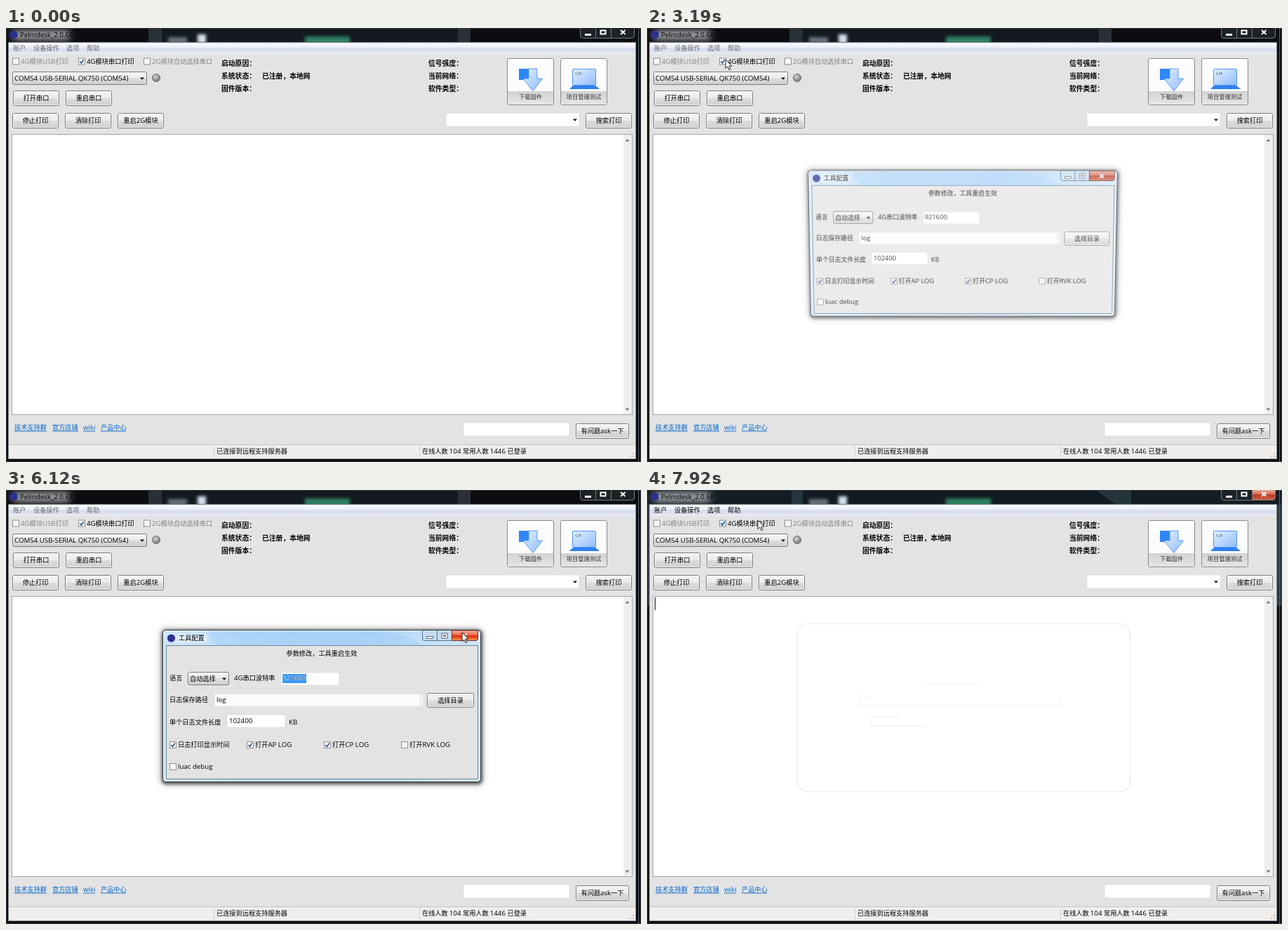
An HTML page for the animation above (8000 ms loop, 905 by 618 pixels).

```html
<!DOCTYPE html>
<html lang="zh-CN">
<head>
<meta charset="utf-8">
<title>Pelmdesk</title>
<style>
html, body { margin: 0; width: 100%; height: 100%; overflow: hidden; background: #08090b; }
svg { position: absolute; left: 0; top: 0; width: 905px; height: 618px; }
text { font: 9.2px "Noto Sans CJK SC", "Noto Sans CJK", "Noto Sans", sans-serif; white-space: pre; }
text.b { font-size: 9.8px; font-weight: 700; }
text.s { font-size: 8.3px; }
tspan { font-family: "Open Sans", "Noto Sans", sans-serif; font-size: 9.7px; }
#dlg { transform-origin: 450px 307.5px; }
.menu text { fill: #6b6b6b; }
.on .menu text { fill: #000; }
.live, .on .idle { display: none; }
.on .live { display: inline; }
</style>
</head>
<body>
<svg id="main" viewBox="0 0 905 618">
  <defs>
    <linearGradient id="btn" x2="0" y2="1"><stop stop-color="#f5f5f5"/><stop offset=".48" stop-color="#ebebeb"/><stop offset=".52" stop-color="#dcdcdc"/><stop offset="1" stop-color="#cfcfcf"/></linearGradient>
    <linearGradient id="hot" x2="0" y2="1"><stop stop-color="#eaf5fc"/><stop offset=".48" stop-color="#d8edf9"/><stop offset=".52" stop-color="#c2e2f5"/><stop offset="1" stop-color="#aed6ee"/></linearGradient>
    <linearGradient id="bar" x2="0" y2="1"><stop stop-color="#fbfcfe"/><stop offset=".45" stop-color="#e6eaf5"/><stop offset=".5" stop-color="#d5dcee"/><stop offset="1" stop-color="#dfe4f2"/></linearGradient>
    <linearGradient id="red" x2="0" y2="1"><stop stop-color="#e8a897"/><stop offset=".45" stop-color="#cf6a55"/><stop offset=".5" stop-color="#b8321c"/><stop offset="1" stop-color="#d0694c"/></linearGradient>
    <linearGradient id="glow" x2="0" y2="1"><stop stop-color="#ffb19c"/><stop offset=".45" stop-color="#f0694c"/><stop offset=".5" stop-color="#d8240c"/><stop offset="1" stop-color="#ff9a4c"/></linearGradient>
    <linearGradient id="sky" x2="1"><stop stop-color="#cfe6fa"/><stop offset=".3" stop-color="#b4d9f8"/><stop offset=".62" stop-color="#acd4f7"/><stop offset="1" stop-color="#d3e9fb"/></linearGradient>
    <linearGradient id="ice" x2="1" y2="1"><stop stop-color="#e4f0ff"/><stop offset="1" stop-color="#8fbcfb"/></linearGradient>
    <linearGradient id="band" x2="0" y2="1"><stop stop-color="#d2d2d2"/><stop offset="1" stop-color="#e6e6e6"/></linearGradient>
    <radialGradient id="ball" cx=".4" cy=".35"><stop stop-color="#d8d8d8"/><stop offset="1" stop-color="#858585"/></radialGradient>
    <filter id="soft" x="-50%" y="-100%" width="200%" height="300%"><feGaussianBlur stdDeviation="2"/></filter>
    <filter id="wide" x="-50%" y="-100%" width="200%" height="300%"><feGaussianBlur stdDeviation="5"/></filter>
  </defs>
</svg>
<svg id="dlg" viewBox="0 0 905 618"></svg>
<svg id="top" viewBox="0 0 905 618">
  <path id="arrow" d="M0 0V12.6L2.9 9.9L5 14.6L7 13.7L5 9.1H9Z" fill="#fff" stroke="#111" stroke-width=".9"/>
  <path id="beam" d="M-3 -6H-1L0 -5.2L1 -6H3M0 -5V5M-3 6H-1L0 5.2L1 6H3" fill="none" stroke="#111"/>
</svg>
<script>
const $ = id => document.getElementById(id);
const rect = (x, y, x2, y2, fill, more = '') =>
  `<rect x="${x}" y="${y}" width="${x2 - x}" height="${y2 - y}" fill="${fill}" ${more}/>`;
const path = (d, fill, more = '') => `<path d="${d}" fill="${fill}" ${more}/>`;
const line = (d, color, w = 1) => path(d, 'none', `stroke="${color}" stroke-width="${w}"`);
const latin = s => s.replace(/[\x21-\x7e][\x20-\x7e]*/g,
  m => `<tspan>${m.replace(/</g, '&lt;')}</tspan>`);
// y is the middle of the line
const text = (x, y, s, more = '') => `<text x="${x}" y="${y + 3.4}" ${more}>${latin(s)}</text>`;
const mid = (x, y, s, more = '') => text(x, y, s, 'text-anchor="middle" ' + more);
const box = (x, y, x2, y2, fill, more = '') =>
  rect(x + .5, y + .5, x2 - .5, y2 - .5, fill, 'rx="2" stroke="#7c7c7c" ' + more);
const button = (x, y, x2, y2, s, id = '') =>
  box(x, y, x2, y2, 'url(#btn)', id && `id="${id}"`) +
  rect(x + 1.5, y + 1.5, x2 - 1.5, y2 - 1.5, 'none', 'rx="1" stroke="#fff" stroke-opacity=".7"') +
  mid((x + x2) / 2, (y + y2) / 2, s);
const field = (x, y, x2, y2, more = '') => rect(x, y, x2, y2, '#fff', 'stroke="#d2d4d8" stroke-width=".6" ' + more);
const drop = (x, y) => path(`M${x - 3} ${y - 1.5}h6l-3 3.2z`, '#111');
const check = (x, y, s, ticked, color = '#000', id = '') =>
  rect(x + .5, y - 4.5, x + 9.5, y + 4.5, '#f6f6f6', `stroke="#8e8f8f" ${id && `id="${id}"`}`) +
  (ticked ? line(`M${x + 2.4} ${y}l2 2.4l3.4 -5`, '#2c4a8c', 1.5) : '') +
  text(x + 12, y, s, `fill="${color}"`);

const glass =
  rect(0, 0, 905, 618, '#0b0d10') +
  `<g class="idle">${rect(203, 0, 662, 21, '#2b2f37')}${rect(222, 0, 644, 21, '#14191f')}</g>` +
  `<g class="live">${rect(0, 0, 905, 21, '#141d23')}${rect(206, 0, 690, 21, '#26343d')}` +
  path('M222 0H640L668 21H222Z', '#131b22') + rect(0, 21, 4, 165, '#2d3840') + rect(898, 21, 905, 165, '#2d3840') + '</g>' +
  `<g filter="url(#soft)">${rect(231, 13, 258, 22, '#8a97a3', 'opacity=".7"')}${rect(273, 9, 285, 22, '#d5e2ee')}` +
  rect(426, 12, 490, 23, '#2f8064') + '</g>' +
  rect(8, 3, 92, 17, '#b5b8bb', 'rx="7" filter="url(#wide)" opacity=".85"') +
  rect(.5, .5, 904.5, 617.5, 'none', 'stroke="#33383d"') + line('M901.5 0V618', '#5c646a') +
  rect(3.5, 20.5, 897.5, 613.5, 'none', 'stroke="#858b90"') +
  '<circle cx="11" cy="9.5" r="5.7" fill="#2b3090"/>' + text(20, 9.5, 'Pelmdesk_2.0.68') +
  path('M818.5 0V11Q818.5 14.5 822 14.5H892Q895.5 14.5 895.5 11V0', '#1d2227', 'stroke="#737a80"') +
  `<g class="live">${path('M862.5 0V14H892Q895 14 895 11V0Z', 'url(#red)')}</g>` +
  line('M840.5 0V14M862.5 0V14', '#737a80') +
  rect(825, 8, 834, 11, '#fff') + rect(847.5, 3.5, 854.5, 8.5, 'none', 'stroke="#fff" stroke-width="2"') +
  line('M876 3L882.5 9M882.5 3L876 9', '#fff', 2);

const bold = [[307, 51, '启动原因：'], [307, 69, '系统状态：'], [365, 69, '已注册，本地网'], [307, 87, '固件版本：'],
  [602, 51, '信号强度：'], [602, 69, '当前网络：'], [602, 87, '软件类型：']];
const links = [[12, 58, '技术支持群'], [66, 103, '官方店铺'], [110, 127, 'wiki'], [135, 171, '产品中心']];
const tile = (x, s) => rect(x + .5, 43.5, x + 66.5, 109.5, '#fcfcfc', 'rx="2" stroke="#8b8b8b"') +
  rect(x + 1, 90, x + 66, 109, 'url(#band)') + mid(x + 33.5, 98, s, 'class="s" fill="#333"');

$('main').innerHTML += glass +
  rect(4, 21, 897, 613, '#e3e3e3') + rect(4, 22, 897, 36, 'url(#bar)') + line('M4 36H897', '#f3f4f7') +
  '<g class="menu">' + text(10, 29, '账户') + text(39, 29, '设备操作') + text(86, 29, '选项') + text(115, 29, '帮助') + '</g>' +
  check(9, 47.5, '4G模块USB打印', false, '#858585') + check(103, 47.5, '4G模块串口打印', true, '#000', 'tick') +
  check(196, 47.5, '2G模块自动选择串口', false, '#858585') +
  box(9, 62, 201, 81, 'url(#btn)', 'id="port"') + text(12, 72, 'COM54 USB-SERIAL QK750 (COM54)') + drop(194, 72) +
  '<circle cx="214" cy="71" r="5.6" fill="url(#ball)" stroke="#777"/>' +
  button(10, 89, 76, 111, '打开串口') + button(85, 89, 151, 111, '重启串口') +
  button(9, 121, 75, 143, '停止打印') + button(84, 121, 150, 143, '清除打印') + button(159, 121, 225, 143, '重启2G模块') +
  bold.map(([x, y, s]) => text(x, y, s, 'class="b"')).join('') +
  tile(714, '下载固件') + rect(731, 58, 746, 74, '#2f86f6') +
  path('M745 58H757V72H764.5L751 89.5L737 72H745Z', 'url(#ice)', 'stroke="#4d93f3" stroke-width=".9"') +
  tile(790, '项目管理测试') + rect(807.5, 58.5, 840.5, 81.5, 'url(#ice)', 'rx="1" stroke="#4d93f3"') +
  line('M813.5 63l-2 1.8l2 1.8M817 62.5l-1.6 4.6M818 63l2 1.8l-2 1.8', '#345', .8) +
  path('M808 82H840L846 87H803Z', '#2f80ee') +
  field(627, 121, 817, 140) + drop(811, 131) + button(826, 121, 892, 143, '搜索打印') +
  rect(8.5, 151.5, 892.5, 550.5, '#fff', 'stroke="#a3a6aa"') + rect(880, 152, 892, 550, '#eeeeee') +
  path('M882.5 161.5h6l-3 -3.4z', '#777') + path('M882.5 541.5h6l-3 3.4z', '#777') +
  links.map(([x, x2, s]) => text(x, 569, s, 'fill="#0066cc"') + line(`M${x} 574H${x2}`, '#0066cc', .9)).join('') +
  field(652, 562, 803, 581) + button(812, 563, 888, 585, '有问题ask一下') +
  rect(4, 593, 897, 613, '#f0eeec') + line('M4 593.5H897', '#c4c4c4') + line('M296.5 595V612M589.5 595V612', '#cfcfcf') +
  text(300, 603, '已连接到远程支持服务器') + text(593, 603, '在线人数 104 常用人数 1446 已登录') +
  path('M893 611h2v-2h-2zM889 611h2v-2h-2zM893 607h2v-2h-2z', '#c3c3c3') +
  `<g id="ghost" fill="none" stroke="#eeeeee" stroke-width="1.4">` +
  '<rect x="214.5" y="190.5" width="474" height="239" rx="14"/>' +
  '<path d="M394 277H473M303 293V307H588V294M303 293h6v3h12M320 336H398M320 336V323H356V327" stroke-width="1"/></g>' +
  line('M11.5 153V171', '#000', 1).replace('<path', '<path id="caret"') +
  '<g id="list">' + rect(82.5, 36.5, 186.5, 57.5, '#f1f1f1', 'stroke="#979797"') +
  rect(84.5, 38.5, 184.5, 55.5, '#dcebfa', 'id="pick" rx="2" stroke="#aecff7"') + text(108, 47, '工具配置') + '</g>';

$('dlg').innerHTML =
  rect(219, 196, 681, 421, '#000', 'rx="10" opacity=".2" filter="url(#wide)"') +
  rect(222, 199, 679, 419, '#000', 'rx="6" opacity=".6" filter="url(#soft)"') +
  rect(223.5, 199.5, 676.5, 415.5, 'url(#sky)', 'rx="5" stroke="#2c3640"') +
  path('M290 201H540Q575 208 592 221H300Q292 212 290 201Z', '#9fcdf6', 'opacity=".45"') +
  rect(224.5, 200.5, 675.5, 414.5, 'none', 'rx="4" stroke="#fff" stroke-opacity=".75"') +
  rect(228.5, 221.5, 672.5, 411.5, '#e3e3e3', 'stroke="#6f8798"') +
  '<circle cx="235.5" cy="211" r="5.6" fill="#2b3090"/>' +
  rect(243, 205, 286, 217, '#fff', 'opacity=".5" filter="url(#soft)"') + text(246, 211, '工具配置') +
  path('M593.5 200V211Q593.5 214.5 597 214.5H669Q672.5 214.5 672.5 211V200', '#c5dcf0', 'stroke="#5d7285"') +
  path('M635.5 200V214.5H669Q672.5 214.5 672.5 211V200Z', 'url(#red)', 'id="quit" stroke="#6b3a35"') +
  line('M614.5 200V214', '#5d7285') +
  rect(599.5, 208.5, 608.5, 211.5, '#fff', 'stroke="#4a5866" stroke-width=".8"') +
  rect(621, 204, 629, 211, '#fff', 'stroke="#4a5866" stroke-width=".9"') + rect(623.5, 206.5, 626.5, 208.5, '#9ab', 'stroke="#4a5866" stroke-width=".7"') +
  line('M650.5 204.5L657 210.5M657 204.5L650.5 210.5', '#5a2a25', 3) + line('M650.5 204.5L657 210.5M657 204.5L650.5 210.5', '#fff', 1.8) +
  mid(450, 233, '参数修改，工具重启生效') +
  text(233, 268, '语言') + box(259, 259, 318, 278, 'url(#btn)') + text(262, 269, '自动选择') + drop(311, 269) +
  text(325, 268, '4G串口波特率') + field(392, 260, 475, 278, 'id="rate"') +
  rect(394, 262, 428, 275, '#3399ff', 'id="sel"') + text(394, 268, '921600') +
  `<clipPath id="cut">${rect(394, 262, 428, 275, '#000', 'id="cutbox"')}</clipPath>` +
  `<g clip-path="url(#cut)">${text(394, 268, '921600', 'fill="#fff"')}</g>` +
  text(233, 299, '日志保存路径') + rect(296.5, 290, 595.5, 309, '#f0f0f0', 'stroke="#d6d6d6" stroke-width=".6"') + rect(298, 291, 589, 307, '#fcfcfc') +
  text(300, 299, 'log') + button(600, 289, 667, 310, '选择目录', 'pickdir') +
  text(233, 331, '单个日志文件长度') + field(315, 320, 398, 338) + text(318, 329, '102400') + text(403, 331, 'KB') +
  check(233, 363, '日志打印显示时间', true) + check(343, 363, '打开AP LOG', true) + check(453, 363, '打开CP LOG', true) +
  check(563, 363, '打开RVK LOG', false) + check(233, 394, 'luac debug', false);

// Runs of picture changes: start, end, count
const runs = [[0, 0, 1], [360, 1140, 11], [1220, 1620, 6], [1696, 2000, 5], [2090, 2090, 1], [2310, 2500, 3],
  [2640, 2690, 2], [2860, 3190, 5], [3265, 3640, 6], [3710, 3950, 4], [4042, 4500, 6], [4580, 4730, 3],
  [4880, 5650, 11], [5740, 6120, 6], [6600, 6820, 4], [6897, 7360, 7], [7460, 7770, 5], [7920, 7920, 1]];
const ticks = runs.flatMap(([a, b, n]) => Array.from({ length: n }, (_, i) => n > 1 ? a + (b - a) * i / (n - 1) : a));

// Keys: time, x, y
const mouse = [[360, 809, 582], [820, 24, 270], [1140, 60, 69], [1220, 68, 64], [1620, 81, 31], [2000, 92, 30], [2090, 96, 48],
  [2310, 100, 29], [2500, 108, 40], [2690, 110, 42], [2860, 112, 45], [3190, 112, 45], [3640, 440, 267], [3950, 423, 264],
  [4042, 432, 266], [4500, 400, 267], [4730, 376, 265], [4880, 372, 265], [5150, 300, 340], [5420, 640, 298], [5650, 400, 286],
  [6043, 648, 206], [6120, 650, 203], [6600, 650, 203], [6820, 549.5, 189.5], [7360, 100, 150], [7770, 118, 43], [7920, 158, 43]];
// Keys: time, opacity, scale, tilt
const pose = [[2940, 0, .92, -12], [3190, .72, .964, -5], [3340, 1, 1, 0], [6600, 1, 1, 0],
  [6673, .93, .99, 3], [6820, .52, .958, 9], [6980, 0, .92, 14]];

function track(keys, t) {
  let i = keys.findIndex(k => k[0] > t);
  if (i < 0) return keys[keys.length - 1].slice(1);
  if (!i) return keys[0].slice(1);
  const a = keys[i - 1], b = keys[i], p = (t - a[0]) / (b[0] - a[0]);
  return a.slice(1).map((v, j) => v + (b[j + 1] - v) * p);
}
const show = (id, on) => $(id).style.display = on ? 'inline' : 'none';
const fill = (id, on, a, b) => $(id).setAttribute('fill', `url(#${on ? a : b})`);

function draw(now) {
  const loop = now % 8000;
  const t = ticks.filter(k => k <= loop + .5).pop();
  const [x, y] = track(mouse, t), [alpha, scale, tilt] = track(pose, t);
  const within = (a, b, c, d) => x >= a && x <= c && y >= b && y <= d;
  const during = (a, b) => t >= a && t < b;
  const dialog = during(2940, 6600);

  $('main').classList.toggle('on', during(1770, 2860) || t >= 6600);
  fill('port', during(1140, 1690), 'hot', 'btn');
  const menu = during(1770, 2860);
  show('list', menu);
  show('pick', menu && y > 37);
  show('caret', t >= 6670 && !during(7050, 7550));
  show('ghost', t >= 6670);
  $('tick').setAttribute('fill', t >= 7700 ? '#d5ecfa' : '#f6f6f6');

  $('dlg').style.visibility = alpha > 0 ? 'visible' : 'hidden';
  $('dlg').style.opacity = alpha;
  $('dlg').style.transform = tilt || scale < 1 ? `perspective(1000px) rotateX(${tilt}deg) scale(${scale})` : 'none';
  fill('pickdir', dialog && within(600, 289, 667, 310), 'hot', 'btn');
  fill('quit', dialog && within(635, 199, 672, 215), 'glow', 'red');
  const from = t < 4042 ? 428 : t > 4500 ? 394 : Math.max(394, Math.min(428, x));
  for (const id of ['sel', 'cutbox']) {
    $(id).setAttribute('x', from);
    $(id).setAttribute('width', 428 - from);
  }

  const beam = during(4042, 4880) || (dialog
    ? within(392, 260, 475, 278) || within(315, 320, 398, 338) || within(297, 290, 595, 309)
    : !menu && within(9, 152, 880, 549));
  show('arrow', t >= 360 && !beam);
  show('beam', t >= 360 && beam);
  $(beam ? 'beam' : 'arrow').setAttribute('transform', `translate(${x} ${y})`);
}
const start = performance.now();
function tick() {
  draw(performance.now() - start);
  requestAnimationFrame(tick);
}
tick();
</script>
</body>
</html>
```
